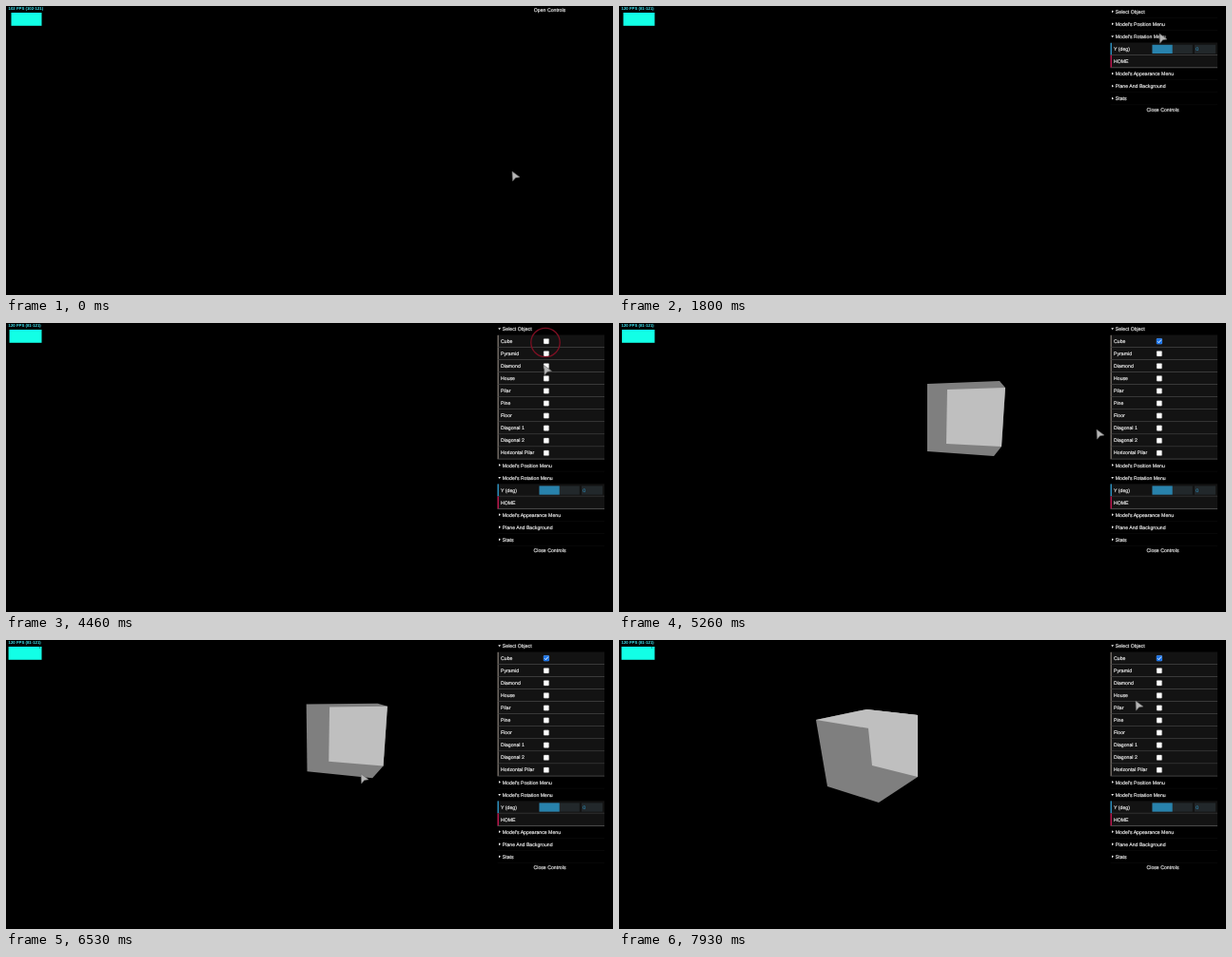
These frames come from a looping animation (638x304 px, 8000 ms). An HTML page:

```html
<!DOCTYPE html>
<html lang="en">
<head>
<meta charset="utf-8">
<title>Model controls</title>
<style>
  html, body { margin: 0; width: 100%; height: 100%; overflow: hidden; background: #000; }
  svg { display: block; width: 638px; height: 304px; background: #000; }
  text {
    font: 5.2px "Liberation Sans", Arial, sans-serif;
    fill: #eee; stroke: #eee; stroke-width: .16px;
    text-rendering: geometricPrecision;
  }
  #fps { font-weight: bold; font-size: 4.3px; fill: #3ee8f4; stroke: none; }
  .value { fill: #2fa1d6; stroke: none; }
</style>
</head>
<body>
<svg id="stage" viewBox="0 0 638 304">
  <defs><clipPath id="fold"><rect id="foldBox" x="510" y="12.5" width="128" height="0"/></clipPath></defs>
</svg>
<script>
const LOOP = 8000, ROW = 13.06;
const OPEN_AT = 1530, FOLD_AT = 3080, CHECK_AT = 4530;
const stage = document.getElementById('stage');
const foldBox = document.getElementById('foldBox');

function add(parent, tag, attrs = {}, content) {
  const el = document.createElementNS('http://www.w3.org/2000/svg', tag);
  set(el, attrs);
  if (content !== undefined) el.textContent = content;
  parent.append(el);
  return el;
}
function set(el, attrs) { for (const k in attrs) el.setAttribute(k, attrs[k]); }
function show(el, on) { el.style.display = on ? '' : 'none'; }
function rect(parent, x, y, width, height, fill) {
  return add(parent, 'rect', { x, y, width, height, fill });
}
function group(parent) { return add(parent, 'g'); }
function shift(el, y) { el.setAttribute('transform', `translate(0 ${y})`); }

// Cube
const cube = group(stage);
const hull = add(cube, 'polygon', { fill: '#7f7f7f' });
const lid = add(cube, 'polygon', { fill: '#bfbfbf' });
const back = add(cube, 'polygon', { fill: '#bfbfbf' });

// Corners: top left, back, right, front; then the same four at the bottom
const level = [[324, 64], [345, 70], [406, 68], [400, 61], [324, 135], [344, 127], [402, 130], [394, 140]];
const above = [[275, 84], [316, 73], [376, 79], [345, 94.2], [280, 154], [316, 132], [370, 144], [342, 171]];
const moved = [[207, 84], [260, 73], [314, 79], [270, 94.2], [219, 154], [266, 132], [314, 144], [273, 171]];

function convexHull(points) {
  const sorted = [...points].sort((a, b) => a[0] - b[0] || a[1] - b[1]);
  const half = list => {
    const out = [];
    for (const p of list) {
      while (out.length > 1) {
        const [a, b] = out.slice(-2);
        if ((b[0] - a[0]) * (p[1] - a[1]) - (b[1] - a[1]) * (p[0] - a[0]) > 0) break;
        out.pop();
      }
      out.push(p);
    }
    return out.slice(0, -1);
  };
  return [...half(sorted), ...half(sorted.reverse())];
}

// Frame rate meter
const fps = add(stage, 'text', { id: 'fps', x: 2.6, y: 4.3 });
const graph = rect(stage, 5.5, 7, 32, 13.8, '#12ffe6');
const dip = rect(stage, 35, 7, .6, 2, '#067');

// Control panel
const panel = group(stage);
const closeBar = add(stage, 'text', { x: 571.5, 'text-anchor': 'middle' });

function folder(parent, row, name, open) {
  const g = group(parent), y = 6 + ROW * row;
  rect(g, 516.5, y + 6.2, 112.5, .5, '#0e0e0e');
  const arrow = add(g, 'path', { fill: '#eee' });
  add(g, 'text', { x: 521.8, y: y + 1.9 }, name);
  const turn = down => arrow.setAttribute('d', down
    ? `M517.3 ${y - .8}h2.8l-1.4 2z` : `M518 ${y - 1.6}v2.8l2-1.4z`);
  turn(open);
  return turn;
}
function item(parent, row, name, edge) {
  const g = group(parent), y = 6 + ROW * row;
  rect(g, 516.5, y - 6.4, 112.5, 13, '#131313');
  rect(g, 516.5, y + 6.1, 112.5, .9, '#555');
  rect(g, 516.5, y - 6.4, 1.5, 12.7, edge);
  add(g, 'text', { x: 520, y: y + 1.9 }, name);
  return g;
}

const turnSelect = folder(panel, 0, 'Select Object', false);
const objects = add(panel, 'g', { 'clip-path': 'url(#fold)' });
const names = ['Cube', 'Pyramid', 'Diamond', 'House', 'Pilar', 'Pine', 'Floor',
  'Diagonal 1', 'Diagonal 2', 'Horizontal Pilar'];
const items = names.map((name, i) => {
  const g = item(objects, 1, name, '#6c655f');
  add(g, 'rect', { x: 565.1, y: 16.4, width: 5.6, height: 5.6, rx: .8,
    fill: '#fff', stroke: '#888', 'stroke-width': .4 });
  return g;
});
const tick = group(items[0]);
add(tick, 'rect', { x: 564.9, y: 16.2, width: 6, height: 6, rx: .9, fill: '#1a73e8' });
add(tick, 'path', { d: 'M566.1 19.3l1.3 1.4 2.4-3', fill: 'none', stroke: '#fff', 'stroke-width': .9 });

const lower = group(panel);
folder(lower, 1, "Model's Position Menu");
folder(lower, 2, "Model's Rotation Menu", true);
const angle = item(lower, 3, 'Y (deg)', '#2b8dbb');
rect(angle, 560.5, 40.8, 42.3, 9.2, '#22282b');
rect(angle, 560.5, 40.8, 21.2, 9.2, '#2882ac');
rect(angle, 605, 40.8, 22, 9.2, '#22282b');
add(angle, 'text', { x: 606.3, y: 47.1, class: 'value' }, '0');
item(lower, 4, 'HOME', '#b8164c');
folder(lower, 5, "Model's Appearance Menu");
folder(lower, 6, 'Plane And Background');
folder(lower, 7, 'Stats');

// Pointer
const ring = add(stage, 'circle', { r: 15.2, fill: 'none', stroke: '#7c0f22', 'stroke-width': 1.3 });
const pointer = add(stage, 'path', {
  d: 'M0 0L8 6 3.6 6.7.5 10.2Z', fill: '#b6b6b6', stroke: '#666', 'stroke-width': .6, 'stroke-linejoin': 'round'
});

const path = [
  [0, 532, 174], [860, 565.5, 34], [930, 565.5, 34], [1200, 568, 29], [2060, 568, 29],
  [2860, 527.5, 30], [3460, 527.5, 30], [4200, 565.5, 44.5], [4740, 565.5, 44.5],
  [5260, 502, 112], [5400, 502, 112], [5860, 435, 142], [6260, 375, 141],
  [6460, 375, 141], [6860, 352, 139], [7200, 352, 139], [7600, 500, 82],
  [7780, 500, 82], [7930, 543, 64], [LOOP, 543, 64]
];
const clicks = [[1460, 568, 3], [3000, 527.5, 4], [4460, 567, 20.5]];

const clamp = v => Math.min(1, Math.max(0, v));
const smooth = v => v * v * (3 - 2 * v);
const span = (t, from, to) => clamp((t - from) / (to - from));
const mix = (a, b, p) => a + (b - a) * p;
const blend = (a, b, p) => a.map((v, i) => [mix(v[0], b[i][0], p), mix(v[1], b[i][1], p)]);

function pointerAt(t) {
  const i = Math.max(1, path.findIndex(k => k[0] > t));
  const a = path[i - 1], b = path[i], p = smooth(span(t, a[0], b[0]));
  return [mix(a[1], b[1], p), mix(a[2], b[2], p)];
}

function drawCube(t) {
  show(cube, t >= CHECK_AT);
  const pose = t < 7200
    ? blend(level, above, smooth(span(t, 6400, 6900)))
    : blend(above, moved, span(t, 7200, 7620));
  const pick = ids => ids.map(i => pose[i]).join(' ');
  set(hull, { points: convexHull(pose).join(' ') });
  set(back, { points: pick([1, 2, 6, 5]) });
  set(lid, { points: pick([0, 1, 2, 3]) });
  show(lid, pose[3][1] > pose[2][1] && pose[0][1] > pose[1][1]);
}

function drawMeter(t) {
  const ticks = Math.floor((t + 200) / 1000);
  const left = Math.max(2.6, 5.5 - .483 * ticks);
  set(graph, { x: left, width: 37.5 - left });
  fps.textContent = ['102 FPS (102-121)', '120 FPS (102-121)', '120 FPS (81-121)'][Math.min(2, ticks)];
  show(dip, t >= 5800);
  set(dip, { x: 35.2 - .483 * (ticks - 6) });
}

function drawPanel(t) {
  const open = t >= OPEN_AT;
  const p = 1 - (1 - span(t, FOLD_AT, FOLD_AT + 100)) ** 2;
  show(panel, open);
  turnSelect(p > 0);
  show(objects, p > 0);
  set(foldBox, { height: ROW * names.length * p + .6 });
  items.forEach((g, i) => shift(g, ROW * i * p));
  shift(lower, ROW * names.length * p);
  show(tick, t >= CHECK_AT);
  closeBar.textContent = open ? 'Close Controls' : 'Open Controls';
  set(closeBar, { y: open ? 110.5 + ROW * names.length * p : 6.1 });
}

function drawPointer(t) {
  const [x, y] = pointerAt(t);
  set(pointer, { transform: `translate(${x} ${y})` });
  const hit = clicks.find(c => t >= c[0] && t < c[0] + 195);
  show(ring, hit);
  if (hit) set(ring, { cx: hit[1], cy: hit[2] });
}

const start = performance.now();
function frame() {
  const t = (performance.now() - start) % LOOP;
  drawCube(t);
  drawMeter(t);
  drawPanel(t);
  drawPointer(t);
  requestAnimationFrame(frame);
}
frame();
</script>
</body>
</html>
```
